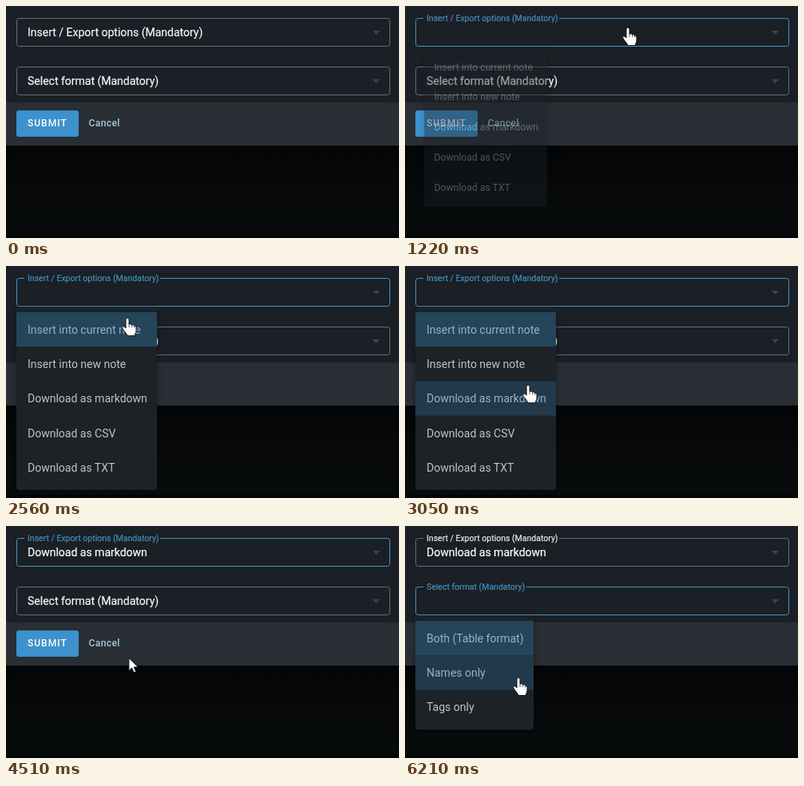
These frames come from a looping animation (492x291 px, 8 s). An HTML page:

```html
<!DOCTYPE html>
<html lang="en">
<head>
<meta charset="utf-8">
<title>Export options</title>
<style>
  html, body { margin: 0; width: 100%; height: 100%; overflow: hidden; background: #07090b; }
  svg { display: block; width: 492px; height: 291px; font-family: Roboto, Arial, sans-serif; font-size: 14px; }
</style>
</head>
<body>
<svg id="stage" viewBox="0 0 492 291">
  <defs>
    <linearGradient id="shade" x1="0" y1="0" x2="0" y2="1">
      <stop offset="0" stop-color="#040506"/>
      <stop offset=".5" stop-color="#07090b"/>
      <stop offset="1" stop-color="#080b0c"/>
    </linearGradient>
    <filter id="shadow" x="-20%" y="-20%" width="140%" height="140%">
      <feDropShadow dx="0" dy="3" stdDeviation="4" flood-color="#000" flood-opacity=".4"/>
    </filter>
  </defs>
  <rect y="175" width="492" height="112" fill="url(#shade)"/>
  <rect y="287" width="492" height="4" fill="#040506"/>
  <rect width="492" height="122" fill="#1a2025"/>
  <rect y="121" width="492" height="54" fill="#292f35"/>
  <rect x="13" y="131" width="78" height="33" rx="3" fill="#3d91cd"/>
  <g font-size="12" font-weight="500">
    <text x="27" y="151" fill="#fff" letter-spacing="1">SUBMIT</text>
    <text x="103.5" y="151" fill="#a5c8df" letter-spacing=".4">Cancel</text>
  </g>
</svg>
<script>
const LOOP = 8000;
const stage = document.getElementById('stage');

function add(parent, tag, attrs, text) {
  const node = document.createElementNS('http://www.w3.org/2000/svg', tag);
  set(node, attrs);
  if (text) node.textContent = text;
  parent.append(node);
  return node;
}
function set(node, attrs) {
  for (const key in attrs) node.setAttribute(key, attrs[key]);
}
const clamp = x => Math.max(0, Math.min(1, x));
const ramp = (t, start, length) => clamp((t - start) / length);
const mix = (a, b, p) => a + (b - a) * p;
const smooth = p => p * p * (3 - 2 * p);

// cubic-bezier(0, 0, .2, 1), solved for x by bisection
function decelerate(x) {
  let lo = 0, hi = 1;
  for (let i = 0; i < 20; i++) {
    const u = (lo + hi) / 2;
    if (.6 * u * u * (1 - u) + u ** 3 < x) lo = u; else hi = u;
  }
  return 3 * lo * lo - 2 * lo ** 3;
}
function blend(a, b, p) {
  return `rgb(${a.map((v, i) => Math.round(mix(v, b[i], p)))})`;
}

const WHITE = [245, 247, 248], BLUE = [70, 147, 197];
const EDGE = [98, 110, 125], EDGE_HOVER = [205, 213, 219];

function makeField(top, label, gapEnd, focusAt, blurAt) {
  const g = add(stage, 'g');
  return {
    top, focusAt, blurAt,
    box: add(g, 'rect', { x: 13.5, y: top + .5, width: 467, height: 35, rx: 3, fill: 'none' }),
    gap: add(g, 'rect', { x: 23, y: top - 1, height: 3, fill: '#1a2025' }),
    gapWidth: gapEnd - 23,
    arrow: add(g, 'path', { d: `M459 ${top + 16}h9l-4.5 5z`, fill: '#3c444a' }),
    label: add(g, 'text', { 'stroke-width': .2 }, label),
    value: add(g, 'text', { x: 27, y: top + 23, fill: '#fff', stroke: '#fff', 'stroke-width': .2 })
  };
}

function makeMenu(top, width, names, openAt, closeAt) {
  const g = add(stage, 'g');
  const height = names.length * 43.2 + 14;
  add(g, 'rect', { x: 13, y: top, width, height, rx: 3, fill: '#1a2025', filter: 'url(#shadow)' });
  const items = names.map((name, i) => {
    const y = top + 7 + i * 43.2;
    return {
      y,
      back: add(g, 'rect', { x: 13, y, width, height: 43.2 }),
      text: add(g, 'text', { x: 27, y: Math.round(y + 27) }, name)
    };
  });
  return { g, top, width, items, openAt, closeAt };
}

const fields = [
  makeField(15, 'Insert / Export options (Mandatory)', 193, 1040, 5205),
  makeField(76, 'Select format (Mandatory)', 152, 5205, Infinity)
];
const menus = [
  makeMenu(51, 176, ['Insert into current note', 'Insert into new note', 'Download as markdown',
    'Download as CSV', 'Download as TXT'], 1172, 4380),
  makeMenu(112, 148, ['Both (Table format)', 'Names only', 'Tags only'], 5345, Infinity)
];

const pointer = add(stage, 'g', { stroke: '#111', 'stroke-width': 1, 'stroke-linejoin': 'round' });
const arrow = add(pointer, 'path', { fill: '#fff', d: 'M0 0V16l3.7-3.5 2.5 6 2.6-1.1-2.5-5.8h5.2z' });
const hand = add(pointer, 'g');
add(hand, 'path', { fill: '#fff', d: 'M-2 2a2 2 0 0 1 4 0V8q2.6-.8 3.6.9q2.2-.5 3 1q2.4-.2 2.4 2.3v4q0 2.6-1.6 4.6V22.5H-.6V21l-5.2-7q-1.5-2.6.4-3.2q1.4-.4 3.4 2.2z' });
add(hand, 'path', { fill: 'none', 'stroke-width': .7, d: 'M2 8v4M5.6 9v3.2M8.6 10v2.6' });

// time, x, y of the pointer tip
const route = [
  [270, 312, 260], [1020, 279, 27], [1330, 279, 27], [1880, 140, 178], [1910, 139, 182],
  [2040, 135, 219], [2220, 142, 259], [2560, 152, 65], [2640, 152, 66], [2720, 152, 66],
  [3370, 156, 228], [3530, 156, 228], [3660, 160, 247], [3740, 160, 248], [4030, 148, 170],
  [4400, 148, 170], [5150, 247, 93], [5480, 247, 93], [5970, 150, 172], [6210, 142, 190]
];
function pointerAt(t) {
  const i = route.findIndex(p => p[0] > t);
  if (i < 0) return route.at(-1).slice(1);
  if (i === 0) return [-99, -99];
  const [a, b] = [route[i - 1], route[i]];
  const p = smooth((t - a[0]) / (b[0] - a[0]));
  return [mix(a[1], b[1], p), mix(a[2], b[2], p)];
}

function drawField(f, t, y, blocked) {
  const focus = ramp(t, f.focusAt, 120) * (1 - ramp(t, f.blurAt, 150));
  const lift = decelerate(ramp(t, f.focusAt, 200));
  const hovered = !blocked && y >= f.top && y <= f.top + 36;
  set(f.box, { stroke: blend(hovered ? EDGE_HOVER : EDGE, BLUE, focus) });
  set(f.gap, { width: f.gapWidth * ramp(t, f.focusAt, 60) });
  const color = blend(WHITE, BLUE, focus);
  set(f.label, {
    fill: color, stroke: color,
    transform: `translate(27 ${mix(f.top + 23, f.top + 3.8, lift)}) scale(${mix(1, .75, lift)})`
  });
}

function drawMenu(m, t, x, y) {
  const shown = ramp(t, m.openAt, 120) * (1 - ramp(t, m.closeAt, 120));
  const scale = mix(.8, 1, t < m.closeAt ? smooth(shown) : 1);
  const cx = 13 + m.width / 2;
  set(m.g, {
    opacity: shown,
    display: shown ? 'inline' : 'none',
    transform: `translate(${cx} ${m.top}) scale(${scale}) translate(${-cx} ${-m.top})`
  });
  const focus = ramp(t, m.openAt + 120, 100);
  m.items.forEach((item, i) => {
    const hover = shown === 1 && x > 13 && x < 13 + m.width && y >= item.y && y < item.y + 43.2;
    const lit = i === 0 ? focus : +hover;
    set(item.back, { fill: i === 0 ? '#24455a' : '#22394b', opacity: lit });
    set(item.text, { fill: blend([186, 197, 204], [146, 180, 201], lit) });
  });
  return shown > 0;
}

function render(t) {
  const [x, y] = pointerAt(t);
  const open = menus.map(m => drawMenu(m, t, x, y)).some(Boolean);
  fields.forEach(f => drawField(f, t, y, open));
  fields[0].value.textContent = t >= 4380 ? 'Download as markdown' : '';
  const overField = fields.some(f => y >= f.top && y <= f.top + 36);
  set(pointer, { transform: `translate(${x} ${y})` });
  set(hand, { display: open || overField ? 'inline' : 'none' });
  set(arrow, { display: open || overField ? 'none' : 'inline' });
}

const began = performance.now();
function frame() {
  render((performance.now() - began) % LOOP);
  requestAnimationFrame(frame);
}
render(0);
requestAnimationFrame(frame);
</script>
</body>
</html>
```
